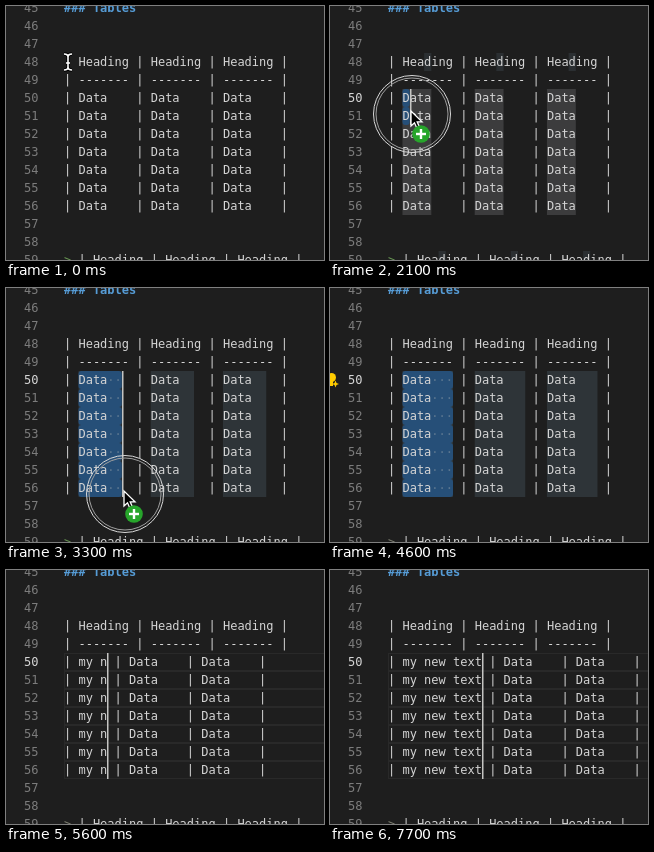
Recreate the animation shown at these times as an HTML page with a canvas. Size 318 by 254 pixels, loop 8 s.

```html
<!DOCTYPE html>
<html lang="en">
<head>
<meta charset="utf-8">
<title>Column selection</title>
<style>
  html, body { margin: 0; width: 100%; height: 100%; overflow: hidden; background: #1e1e1e; }
  canvas { display: block; }
</style>
</head>
<body>
<canvas id="stage" width="318" height="254"></canvas>
<script>
const ctx = document.getElementById('stage').getContext('2d');
const LOOP = 8000, STEP = 100, LINE = 18, CHAR = 7.224, LEFT = 58;
const FIRST = 50, LAST = 56;
const FONT = '12px "DejaVu Sans Mono", "Liberation Mono", monospace';
const HEADING = '| Heading | Heading | Heading |';
const TYPED = 'my new text';
const KEY_TIMES = [4700, 5100, 5300, 5500, 5700, 5800, 5900, 6200, 6300, 6600, 6700];

// [time, x, y]
const HOVER = [[0, 62, 56], [200, 61, 120], [400, 64, 215], [500, 72, 180], [700, 73, 93], [1700, 73, 93]];
const DRAG = [[1800, 71, 86], [2000, 78, 97], [2100, 82, 108], [2300, 88, 160], [2500, 95, 214],
  [2600, 99, 214], [2900, 110, 209], [3300, 119, 206], [3500, 124, 207]];

const colX = col => LEFT + col * CHAR;
const rowY = row => 47 + (row - 48) * LINE;
const clamp = (v, lo, hi) => Math.min(hi, Math.max(lo, v));

function along(path, t) {
  const i = path.findIndex(p => p[0] > t);
  if (i < 0) return path[path.length - 1].slice(1);
  if (i === 0) return path[0].slice(1);
  const a = path[i - 1], b = path[i], k = (t - a[0]) / (b[0] - a[0]);
  return [a[1] + (b[1] - a[1]) * k, a[2] + (b[2] - a[2]) * k];
}

function text(str, row, x, color, bold) {
  ctx.font = (bold ? 'bold ' : '') + FONT;
  ctx.fillStyle = color;
  [...str].forEach((ch, i) => {
    if (ch !== ' ') ctx.fillText(ch, x + i * CHAR, rowY(row) + 13);
  });
}

function mark(row, from, to, color, radius = 0) {
  ctx.fillStyle = color;
  ctx.beginPath();
  ctx.roundRect(colX(from), rowY(row), (to - from) * CHAR, LINE, radius);
  ctx.fill();
}

function eachRow(from, to, draw) {
  for (let row = from; row <= to; row++) draw(row);
}

function caret(row, col) {
  ctx.fillStyle = '#c4c4c2';
  ctx.fillRect(Math.round(colX(col)), rowY(row), 1.5, LINE);
}

function lineBorder(row) {
  ctx.strokeStyle = '#292929';
  ctx.lineWidth = 1;
  ctx.strokeRect(LEFT + .5, rowY(row) + .5, 270, LINE - 1);
}

function ibeam(x, y) {
  const shape = new Path2D('M-4 -8Q0 -8 0 -5V5Q0 8 -4 8M4 -8Q0 -8 0 -5M0 5Q0 8 4 8M-2 1H2');
  ctx.save();
  ctx.translate(x, y);
  for (const [color, width] of [['#000', 3.4], ['#fff', 1.6]]) {
    ctx.strokeStyle = color;
    ctx.lineWidth = width;
    ctx.stroke(shape);
  }
  ctx.restore();
}

function ring(x, y, alpha) {
  ctx.save();
  ctx.globalAlpha = alpha;
  ctx.lineWidth = 1;
  for (const [r, color] of [[38.5, '#d8d8d8'], [36, '#a0a0a0']]) {
    ctx.strokeStyle = color;
    ctx.beginPath();
    ctx.arc(x, y, r, 0, 7);
    ctx.stroke();
  }
  ctx.restore();
}

function copyPointer(x, y) {
  ctx.save();
  ctx.translate(x - 1, y - 3);
  const arrow = new Path2D('M0 0V15L3.5 11.8L6 17.5L8.6 16.4L6.2 10.8H11Z');
  ctx.fillStyle = '#000';
  ctx.strokeStyle = '#fff';
  ctx.lineWidth = 1.3;
  ctx.fill(arrow);
  ctx.stroke(arrow);
  ctx.fillStyle = '#27a52b';
  ctx.beginPath();
  ctx.arc(10, 23, 8.8, 0, 7);
  ctx.fill();
  ctx.fillStyle = '#fff';
  ctx.fillRect(5, 21.8, 10, 2.4);
  ctx.fillRect(8.8, 18, 2.4, 10);
  ctx.restore();
}

function bulb() {
  ctx.fillStyle = '#ffcc00';
  ctx.beginPath();
  ctx.arc(1.5, 89.5, 4.5, 0, 7);
  ctx.fill();
  ctx.fillRect(-1, 93, 4, 5);
  ctx.fill(new Path2D('M5.5 92.5L6.5 95L9 96L6.5 97L5.5 99.5L4.5 97L2 96L4.5 95Z'));
}

// Highlights, selection and carets while the table is still intact
function drawSelection(t) {
  if (t < 1200) return;
  const [x, y] = along(DRAG, t);
  const dragging = t >= 1800;
  const end = dragging ? clamp(Math.round((x - 1 - LEFT) / CHAR), 2, 9) : 2;
  const bottom = dragging ? clamp(48 + Math.floor((y - 3 - 47) / LINE), FIRST, LAST) : FIRST;

  if (!dragging) lineBorder(FIRST);
  if (t >= 1500) {
    const wide = end > 3;
    eachRow(FIRST, LAST, row => [2, 12, 22].forEach(col =>
      mark(row, col, col + (wide ? end - 2 : 4), wide ? '#2e3438' : '#3c3c3d')));
  }
  if (end === 3) {
    [5, 15, 25].forEach(col => {
      mark(48, col, col + 1, '#2b2f32');
      mark(59, col + 2, col + 3, '#2b2f32');
    });
  }
  if (end > 2) {
    eachRow(FIRST, bottom, row => {
      mark(row, 2, end, '#264f78', 3);
      if (end > 6) text('·'.repeat(end - 6), row, colX(6), '#59758f');
    });
  }
  if (t < 1700 || (dragging && t < 4200)) eachRow(FIRST, bottom, row => caret(row, end));
}

function drawPointer(t) {
  if (t < 1800) {
    ibeam(...along(HOVER, t));
  } else if (t < 3900) {
    const [x, y] = along(DRAG, t);
    ring(x, y, clamp((3900 - t) / 400, 0, 1));
    if (t < 3700) copyPointer(x, y);
    else ibeam(x - 1, y);
  } else if (t < 4600) {
    ibeam(123, 207);
  }
}

function draw(t) {
  ctx.fillStyle = '#1e1e1e';
  ctx.fillRect(0, 0, 318, 254);

  const count = KEY_TIMES.filter(k => k <= t).length;
  if (count) eachRow(FIRST, LAST, lineBorder);
  else drawSelection(t);

  eachRow(45, 59, row => {
    const active = row === FIRST && t >= 1200;
    text(String(row), row, 18, active ? '#d6d6d6' : '#7c7c7c');
  });
  text('### Tables', 45, LEFT, '#569cd6', true);
  text(HEADING, 48, LEFT, '#d4d4d4');
  text(HEADING.replace(/\w/g, '-'), 49, LEFT, '#d4d4d4');
  const cell = count ? TYPED.slice(0, count) : 'Data   ';
  eachRow(FIRST, LAST, row => text(`| ${cell} | Data    | Data    |`, row, LEFT, '#d4d4d4'));
  text('>', 59, LEFT, t < 4200 ? '#6a9955' : '#7f8072');
  text(HEADING, 59, colX(2), '#d4d4d4');

  const blinkedOff = t >= 7200 && t < 7700;
  if (count && !blinkedOff) eachRow(FIRST, LAST, row => caret(row, 2 + count));
  if (t >= 3900 && t < 4900) bulb();
  drawPointer(t);
}

const start = performance.now();
function tick() {
  const t = (performance.now() - start) % LOOP;
  draw(Math.floor(t / STEP) * STEP);
  requestAnimationFrame(tick);
}
tick();
</script>
</body>
</html>
```
